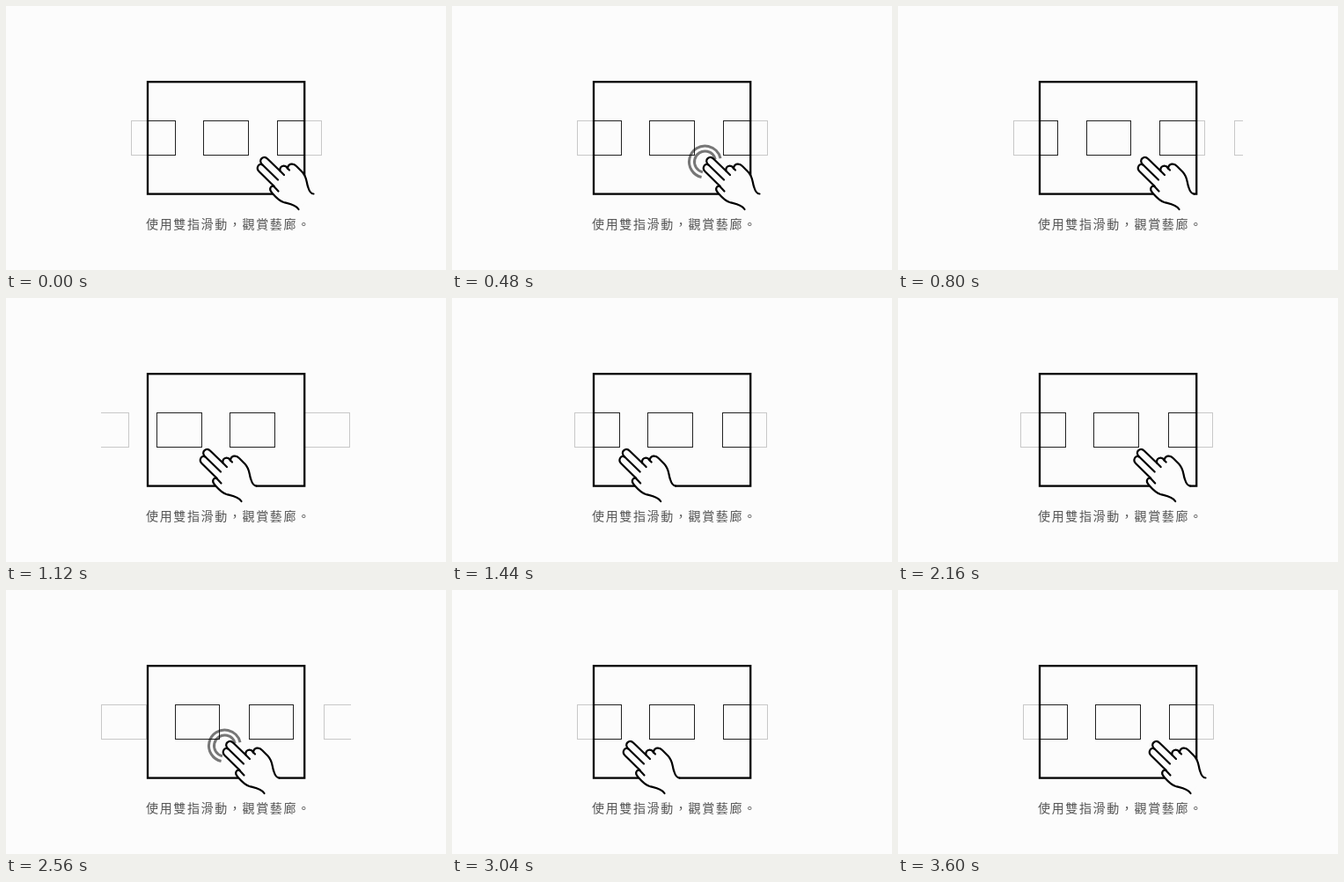
Animation of 500x300 px, one loop 4800 ms. Source, as an HTML page with a canvas:

```html
<!DOCTYPE html>
<html lang="zh-Hant">
<head>
<meta charset="utf-8">
<title>觀賞藝廊</title>
<style>
  html, body { margin: 0; width: 100%; height: 100%; overflow: hidden; background: #fcfcfc; }
  canvas { position: absolute; left: 0; top: 0; }
  p {
    position: absolute; left: 159px; top: 237px; margin: 0;
    font: 300 14px/20px "Noto Sans CJK TC", "Noto Sans CJK", sans-serif;
    letter-spacing: 1.65px; white-space: nowrap; color: #555;
  }
</style>
</head>
<body>
<canvas id="stage" width="500" height="300"></canvas>
<p>使用雙指滑動，觀賞藝廊。</p>
<script>
const ctx = document.getElementById('stage').getContext('2d');
const LOOP = 4800, STEP = 80, PAPER = '#fcfcfc';
const REACH = 104, CARD = 50.4;

// Two swipes: left edges of the cards before and after each one.
const swipes = [
  { start: 720, end: 1360, back: 2320, touch: 320,
    from: [142.2, 224.8, 308.5, 393.5], to: [57, 139.7, 222.7, 307.5] },
  { start: 2320, end: 2960, back: 3600, touch: 2320,
    from: [139.7, 222.7, 307.5, 394], to: [57, 142.2, 224.8, 308.5] }
];

const hand = new Path2D(`M332 231 C328 225 320 224.5 315 223
  C309 221 306 217 301.5 212 C298 208 300 204 304 204.8
  L287 188 C283 184 287 178 291 180.5 L290 179.5
  C286 175 292 169 297 174 L311 187.5
  C310 182 316 179.5 319.5 184.5 C320 179 326 178 329.5 182
  L336 188.5 C342 195 340.5 200 342.8 206 C344 210 346.5 213.5 349 213.5`);
const creases = new Path2D(`M291 180.5 L308.5 197.5 M303 204 L309 210.5
  M311 187.5 L315.5 192 M319.5 184.5 L321.5 186.5`);

const progress = (t, a, b) => Math.min(1, Math.max(0, (t - a) / (b - a)));
const snap = x => Math.floor(x) + 0.5;

function drawCards(xs, color, x, y, w, h) {
  ctx.save();
  ctx.beginPath();
  ctx.rect(x, y, w, h);
  ctx.clip();
  ctx.strokeStyle = color;
  ctx.lineWidth = 1;
  for (const x of xs) {
    const left = snap(x);
    ctx.strokeRect(left, 130.5, snap(x + CARD) - left, 39);
  }
  ctx.restore();
}

function drawRings(x, y, alpha) {
  const mid = Math.PI * 1.25, half = Math.PI * 0.68;
  ctx.save();
  ctx.globalAlpha = alpha;
  ctx.lineWidth = 3;
  for (const r of [12, 18]) {
    ctx.beginPath();
    ctx.arc(x, y, r, mid - half, mid + half);
    ctx.stroke();
  }
  ctx.restore();
}

function draw(t) {
  const s = swipes[t < swipes[1].start ? 0 : 1];
  const p = progress(t, s.start, s.end);
  const shift = -REACH * (p - progress(t, s.end, s.back));
  const cards = s.from.map((x, i) => x + (s.to[i] - x) * p);

  ctx.fillStyle = PAPER;
  ctx.fillRect(0, 0, 500, 300);
  drawCards(cards, '#c8c8c8', 108, 120, 284, 60);
  ctx.fillRect(161, 86, 178, 127.5);
  drawCards(cards, '#222', 161, 86, 178, 127);

  ctx.strokeStyle = '#000';
  ctx.lineWidth = 2.3;
  ctx.strokeRect(161, 86.2, 178.2, 127.4);

  const q = progress(t, s.touch, s.touch + 400);
  const alpha = 0.53 * Math.min(1, 4 * q, 4 * (1 - q));
  if (alpha > 0) drawRings(287.5 + shift, 177, alpha);

  ctx.save();
  ctx.translate(shift + 0.5, 0);
  ctx.lineWidth = 2.2;
  ctx.lineCap = ctx.lineJoin = 'round';
  ctx.fill(hand);
  ctx.stroke(hand);
  ctx.stroke(creases);
  ctx.restore();
}

const begin = performance.now();
function tick() {
  const t = (performance.now() - begin) % LOOP;
  draw(Math.floor(t / STEP) * STEP);
  requestAnimationFrame(tick);
}
tick();
</script>
</body>
</html>
```
